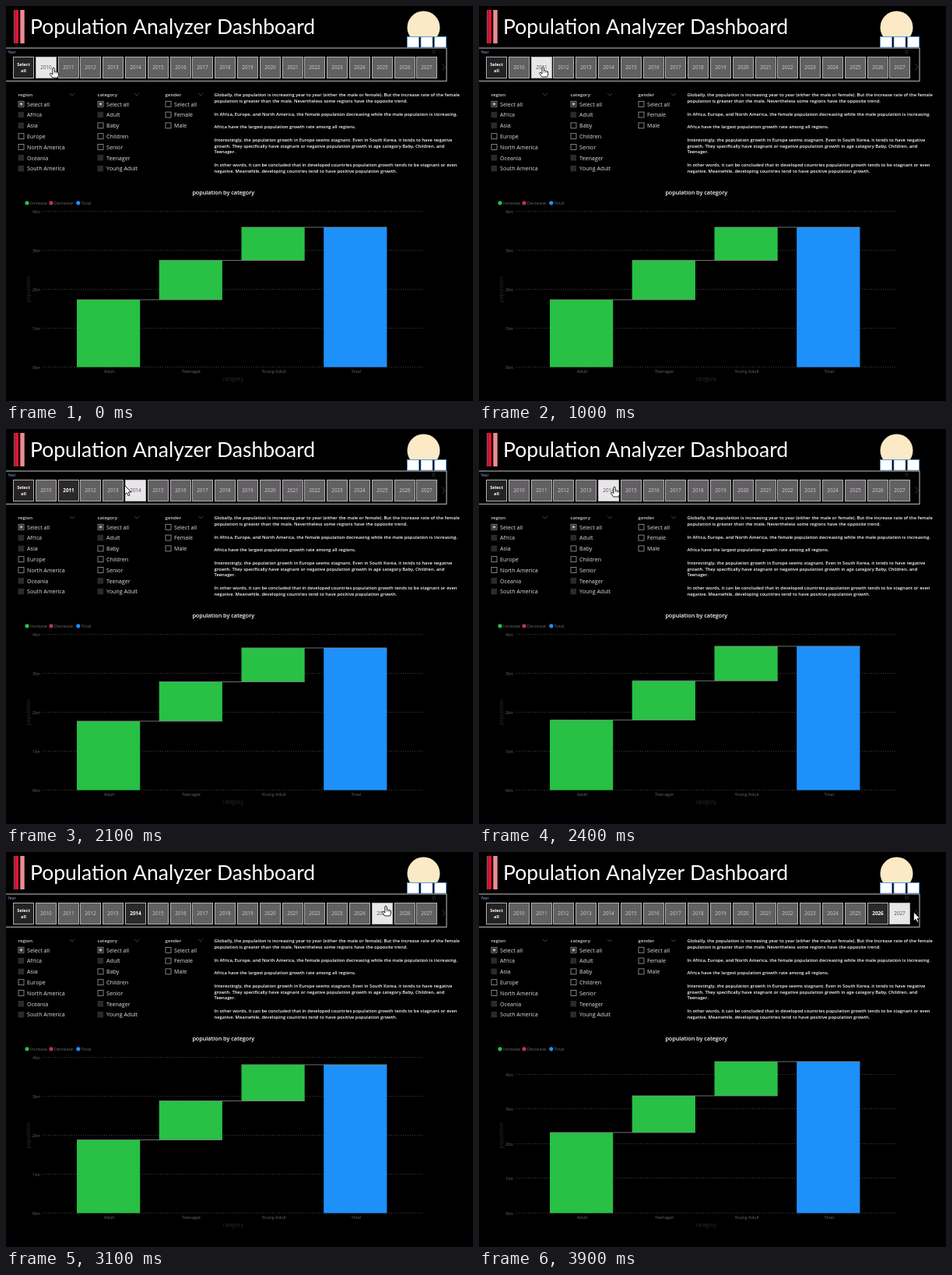
An HTML page with a canvas that plays this animation: 600x507 px, repeating every 4000 ms.

```html
<!DOCTYPE html>
<html lang="en">
<head>
<meta charset="utf-8">
<title>Population Analyzer Dashboard</title>
<style>
  html, body { margin: 0; width: 100%; height: 100%; overflow: hidden; background: #000; }
  canvas { display: block; width: 600px; height: 507px; }
</style>
</head>
<body>
<canvas id="stage" width="600" height="507"></canvas>
<script>
const ctx = document.getElementById("stage").getContext("2d");
const LOOP = 4000, STEP = 100;
const SANS = '"Open Sans", "Noto Sans", sans-serif';
const GREEN = "#28c045", BLUE = "#1e90fa", RED = "#b8364c";

// Pointer tip over time: [ms, x, y]
const path = [
  [0, 61, 79], [300, 62, 79], [700, 80, 78], [1100, 83, 78], [1400, 94.4, 78],
  [1800, 130, 74], [2100, 152.6, 72.5], [2300, 167, 74], [2400, 174, 74],
  [2800, 468.7, 67], [3100, 488, 69], [3500, 515.5, 72], [3700, 520, 73], [3900, 558.5, 77]
];

// Each click selects a year and moves the running totals (in billions).
const picks = [
  { at: 0, year: 2010, sums: [1.73, 2.74, 3.59], unit: 50 },
  { at: 1000, year: 2011, sums: [1.77, 2.78, 3.65], unit: 50 },
  { at: 2300, year: 2014, sums: [1.88, 2.88, 3.81], unit: 50 },
  { at: 3600, year: 2026, sums: [2.33, 3.39, 4.38], unit: 44.4 }
];

const slicers = [
  { x: 15.5, name: "region", arrow: 85, on: [1, 2, 5, 6], partial: true,
    rows: ["Select all", "Africa", "Asia", "Europe", "North America", "Oceania", "South America"] },
  { x: 117.5, name: "category", arrow: 168, on: [1, 5, 6], partial: true,
    rows: ["Select all", "Adult", "Baby", "Children", "Senior", "Teenager", "Young Adult"] },
  { x: 204.5, name: "gender", arrow: 250, on: [], partial: false,
    rows: ["Select all", "Female", "Male"] }
];

const notes = [
  [116, "Globally, the population is increasing year to year (either the male or female). But the increase rate of the female"],
  [124.2, "population is greater than the male. Nevertheless some regions have the opposite trend."],
  [141, "In Africa, Europe, and North America, the female population decreasing while the male population is increasing."],
  [157, "Africa have the largest population growth rate among all regions."],
  [173.5, "Interestingly, the population growth in Europe seems stagnant. Even in South Korea, it tends to have negative"],
  [181.5, "growth. They specifically have stagnant or negative population growth in age category Baby, Children, and"],
  [189.3, "Teenager."],
  [205.5, "In other words, it can be concluded that in developed countries population growth tends to be stagnant or even"],
  [213.7, "negative. Meanwhile, developing countries tend to have positive population growth."]
];

const mix = (a, b, k) => a + (b - a) * k;
const clamp = (v, lo, hi) => Math.min(hi, Math.max(lo, v));

function rect(x, y, w, h, color) {
  ctx.fillStyle = color;
  ctx.fillRect(x, y, w, h);
}

function frame(x, y, w, h, color, width = 1) {
  ctx.strokeStyle = color;
  ctx.lineWidth = width;
  ctx.strokeRect(x, y, w, h);
}

function disc(x, y, r, color) {
  ctx.fillStyle = color;
  ctx.beginPath();
  ctx.arc(x, y, r, 0, 2 * Math.PI);
  ctx.fill();
}

function line(points, color, width = 1, dash = []) {
  ctx.strokeStyle = color;
  ctx.lineWidth = width;
  ctx.setLineDash(dash);
  ctx.beginPath();
  points.forEach(([x, y]) => ctx.lineTo(x, y));
  ctx.stroke();
  ctx.setLineDash([]);
}

function text(str, x, y, size, color, { weight = 400, align = "left", family = SANS } = {}) {
  ctx.font = `${weight} ${size}px ${family}`;
  ctx.textAlign = align;
  ctx.fillStyle = color;
  ctx.fillText(str, x, y);
}

function pointerAt(t) {
  const i = path.findLastIndex(p => p[0] <= t);
  const a = path[i], b = path[i + 1] || a;
  const k = b === a ? 0 : (t - a[0]) / (b[0] - a[0]);
  return { x: mix(a[1], b[1], k), y: mix(a[2], b[2], k) };
}

function chartAt(t) {
  const i = picks.findLastIndex(p => p.at <= t);
  const to = picks[i], from = picks[Math.max(0, i - 1)];
  const u = clamp((t - to.at) / 300, 0, 1);
  const k = u * u * (3 - 2 * u);
  return {
    year: to.year,
    unit: mix(from.unit, to.unit, k),
    sums: to.sums.map((v, j) => mix(from.sums[j], v, k))
  };
}

function drawHeader() {
  rect(10, 5, 1.6, 43, "#b9455a");
  rect(12, 5, 4, 43, "#e2132f");
  rect(18.3, 5, 5.4, 43, "#e98c94");
  text("Population Analyzer Dashboard", 31, 36, 26.5, "#fff", { family: "Lato, sans-serif" });
  disc(536.5, 27.5, 21, "#fbeac5");
  rect(515, 39, 51, 14, "#000");
  for (const x of [515.5, 533, 550.5]) {
    rect(x, 39.5, 15, 13.5, "#fff");
    frame(x, 39.5, 15, 13.5, "#5b9be0", 0.8);
  }
  line([[515, 39.5], [566, 39.5]], "#5b9be0", 0.8);
}

function drawYears(selected, hover) {
  frame(-0.5, 54, 566.5, 42.3, "#c4c4c4");
  text("Year", 2.5, 61, 5, "#8fb4ea");
  frame(548, 57.5, 3, 3, "#333", 0.7);
  text("···", 556, 61, 5, "#444");
  line([[560.5, 74.5], [564, 78.5], [560.5, 82.5]], "#4a4a4a", 0.8);

  const button = (x, fill) => {
    rect(x, 65, 27, 28, fill);
    frame(x + 0.5, 65.5, 26, 27, "#b0b0b0");
  };
  button(9, "#252324");
  text("Select", 22.5, 77, 5.6, "#fff", { weight: 700, align: "center" });
  text("all", 22.5, 85, 5.6, "#fff", { weight: 700, align: "center" });

  for (let i = 0; i < 18; i++) {
    const x = Math.round(37.7 + i * 28.8), year = 2010 + i;
    const active = year === selected, hot = i === hover;
    button(x, hot ? "#e8e6e8" : active ? "#2b292a" : "#626062");
    text(year, x + 13.5, 81.3, 6.3, hot ? "#504e50" : active ? "#fff" : "#d0d0d0",
      { weight: active && !hot ? 700 : 400, align: "center" });
  }
}

function drawSlicer({ x, name, arrow, on, partial, rows }) {
  text(name, x, 116, 6.1, "#d4d4d4", { weight: 600 });
  line([[arrow - 3, 112], [arrow, 115], [arrow + 3, 112]], "#505050", 0.8);
  rows.forEach((label, i) => {
    const y = 125.8 + i * 13.8;
    if (on.includes(i)) {
      rect(x, y - 3.8, 7.6, 7.6, "#2a2a2a");
    } else {
      frame(x + 0.5, y - 3.5, 7, 7, "#a0a0a0", 0.8);
      if (partial && i === 0) rect(x + 2, y - 2, 4, 4, "#a0a0a0");
    }
    text(label, x + 11.5, y + 2.7, 7.15, "#e0e0e0");
  });
}

function drawChart({ sums, unit }) {
  const base = 463.5, width = 81.2, muted = "#686868";
  const top = v => base - v * unit;

  text("population by category", 279.3, 242, 7.2, "#fff", { weight: 600, align: "center" });
  [["Increase", 27, GREEN], ["Decrease", 58, RED], ["Total", 92.8, BLUE]].forEach(([label, x, color]) => {
    disc(x, 252.8, 2.6, color);
    text(label, x + 3.8, 255, 5.7, muted);
  });

  for (let n = 0; n <= 4; n++) {
    const y = Math.round(top(n)) - 0.5;
    line([[48, y], [535, y]], "#404040", 1, [1, 2]);
    text(n + "bn", 44, y + 2.2, 5.5, muted, { align: "right" });
  }

  const bars = [
    ["Adult", 91, 0, sums[0]], ["Teenager", 196.7, sums[0], sums[1]],
    ["Young Adult", 302.5, sums[1], sums[2]], ["Total", 408.2, 0, sums[2]]
  ];
  bars.forEach(([label, x, low, high], i) => {
    rect(x, top(high), width, top(low) - top(high), i < 3 ? GREEN : BLUE);
    text(label, x + width / 2 + 1, 471, 5.6, muted, { align: "center" });
  });
  // Connectors run across both neighbouring bars.
  bars.slice(0, 3).forEach(([, x, , high], i) =>
    line([[x, top(high)], [bars[i + 1][1] + width, top(high)]], "#8c8c8c", 0.8));

  text("category", 291.5, 481, 6.6, "#2c2c2c", { align: "center" });
  ctx.save();
  ctx.translate(31, 363.5);
  ctx.rotate(-Math.PI / 2);
  text("population", 0, 0, 6.6, "#2c2c2c", { align: "center" });
  ctx.restore();
}

const arrowShape = new Path2D("M0 0V11.6L2.6 9.3L4.5 13.3L6.4 12.4L4.6 8.5H8.2Z");
const handShape = new Path2D(
  "M-1.2 1Q0 -1 1.2 1V5Q2.4 4.2 3.2 5.3Q4.4 4.7 5 5.9Q6.5 5.5 6.5 7.3V10L5.4 13H-1.2" +
  "L-4.6 8.6Q-4.6 6.8 -3 7.5L-1.2 9Z");

function drawPointer({ x, y }, isArrow) {
  const shape = isArrow ? arrowShape : handShape;
  ctx.save();
  ctx.translate(x, y);
  ctx.fillStyle = "#fff";
  ctx.strokeStyle = "#111";
  ctx.lineWidth = 0.9;
  ctx.lineJoin = "round";
  ctx.fill(shape);
  ctx.stroke(shape);
  if (!isArrow) {
    line([[1.2, 5], [1.2, 7.5]], "#222", 0.6);
    line([[3.2, 5.5], [3.2, 7.8]], "#222", 0.6);
    line([[5, 6], [5, 8]], "#222", 0.6);
  }
  ctx.restore();
}

function draw(now) {
  const t = Math.floor((now % LOOP) / STEP) * STEP;
  const pointer = pointerAt(t), chart = chartAt(t);
  const hover = clamp(Math.floor((pointer.x - 37) / 28.8), 0, 17);
  const isArrow = (t >= 2000 && t < 2200) || t >= 3900;

  rect(0, 0, 600, 507, "#000");
  drawHeader();
  drawYears(chart.year, hover);
  slicers.forEach(drawSlicer);
  notes.forEach(([y, str]) => text(str, 267.5, y, 5.82, "#fff", { weight: 600 }));
  drawChart(chart);
  drawPointer(pointer, isArrow);
}

const start = performance.now();
function tick() {
  draw(performance.now() - start);
  requestAnimationFrame(tick);
}
tick();
</script>
</body>
</html>
```
